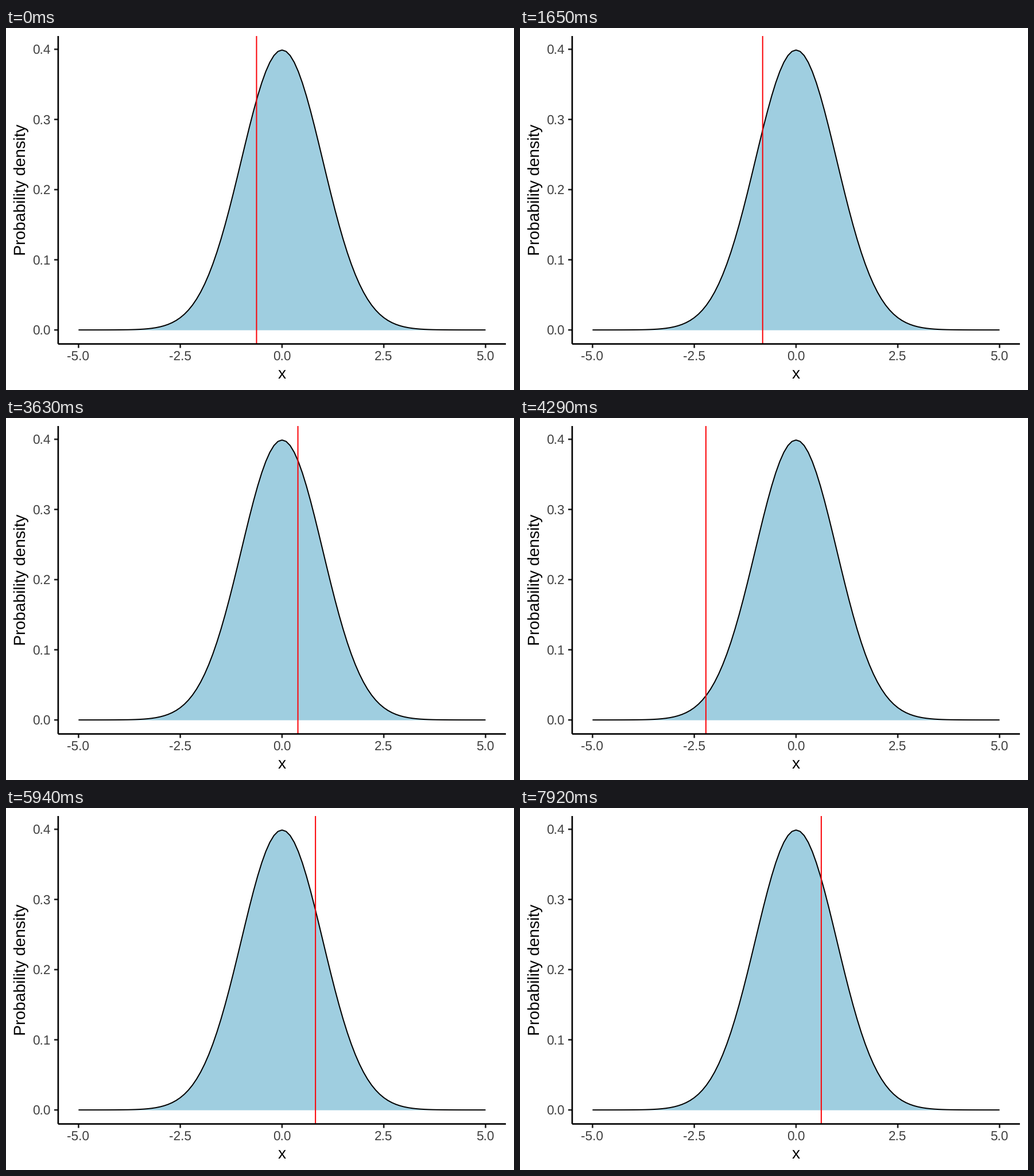
These frames come from a looping animation (885 px wide and 632 px high, 8.25 s). A matplotlib script:

```python
import math

import numpy as np
import matplotlib.pyplot as plt
from matplotlib.animation import FuncAnimation

plt.rcParams.update({"font.family": "Liberation Sans", "text.hinting": "none"})

W, H, DPI = 885, 632, 100
PX = 72 / DPI  # points per pixel
LEFT, RIGHT, TOP, BOTTOM = 90.9, 870.9, 14, 551.6
PEAK = 1 / math.sqrt(2 * math.pi)
AXIS_W, LINE_W = 2.67 * PX, 2 * PX
TITLE, TICK = 28.2, 22.6  # font sizes in pixels
STEPS = 25


def normal_draws(seed, n):
    """Normal draws by inversion, with R's seeding of the Mersenne Twister."""
    words = []
    for _ in range(675):
        seed = (69069 * seed + 1) % 2**32
        words.append(seed)
    rng = np.random.RandomState()
    rng.set_state(("MT19937", np.array(words[51:], dtype=np.uint32), 624))
    u = rng.randint(0, 2**32, size=2 * n, dtype=np.uint32)[::2] / 2**32
    z = np.linspace(-5, 5, 10001)
    cdf = [(1 + math.erf(v / math.sqrt(2))) / 2 for v in z]
    return np.interp(u, cdf, z)


draws = normal_draws(1, STEPS)

fig = plt.figure(figsize=(W / DPI, H / DPI), dpi=DPI, facecolor="white")
ax = fig.add_axes([LEFT / W, 1 - BOTTOM / H,
                   (RIGHT - LEFT) / W, (BOTTOM - TOP) / H])
ax.set_xlim(-5.5, 5.5)
ax.set_ylim(-0.05 * PEAK, 1.05 * PEAK)


def label(x, y, text, size, color, **kw):
    """Write text with its baseline at a pixel position measured from the top left."""
    kw = {"ha": "center", "va": "baseline", **kw}
    fig.text(x / W, 1 - y / H, text, fontsize=size * PX, color=color, **kw)


def px(x, y):
    """Data position to pixels from the top left."""
    u, v = ax.transData.transform((x, y))
    return u, H - v


# density
x = np.linspace(-5, 5, 101)
density = PEAK * np.exp(-x**2 / 2)
ax.fill_between(x, 0, density, color="#9fcee0", lw=0, zorder=1)
ax.plot(x, density, color="black", lw=LINE_W, solid_capstyle="butt", zorder=2)
marker = ax.axvline(draws[0], color="#fb0207", lw=LINE_W, snap=False,
                    solid_capstyle="butt", zorder=2.2)

# axes
ax.spines[["top", "right"]].set_visible(False)
for side in ("left", "bottom"):
    ax.spines[side].set(linewidth=AXIS_W, capstyle="butt", snap=False)
ax.set_xticks([])
ax.set_yticks([])
xticks, yticks = np.arange(-5, 5.1, 2.5), np.arange(5) / 10
style = dict(color="#242424", lw=AXIS_W, clip_on=False, snap=False)
ax.vlines(xticks, -7 / (BOTTOM - TOP), 0,
          transform=ax.get_xaxis_transform(), **style)
ax.hlines(yticks, -7 / (RIGHT - LEFT), 0,
          transform=ax.get_yaxis_transform(), **style)

for t in xticks:
    label(px(t, 0)[0] - 0.5, 580, f"{t:.1f}", TICK, "#404040")
for t in yticks:
    label(78, px(0, t)[1] + 7.7, f"{t:.1f}", TICK, "#404040", ha="right")
label((LEFT + RIGHT) / 2 - 0.5, 612, "x", TITLE, "black")
label(34, (TOP + BOTTOM) / 2, "Probability density", TITLE, "black",
      rotation=90, rotation_mode="anchor")


def update(i):
    marker.set_xdata([draws[i]] * 2)
    return [marker]


anim = FuncAnimation(fig, update, frames=STEPS, interval=330,
                     repeat=True, repeat_delay=0)
plt.show()
```
